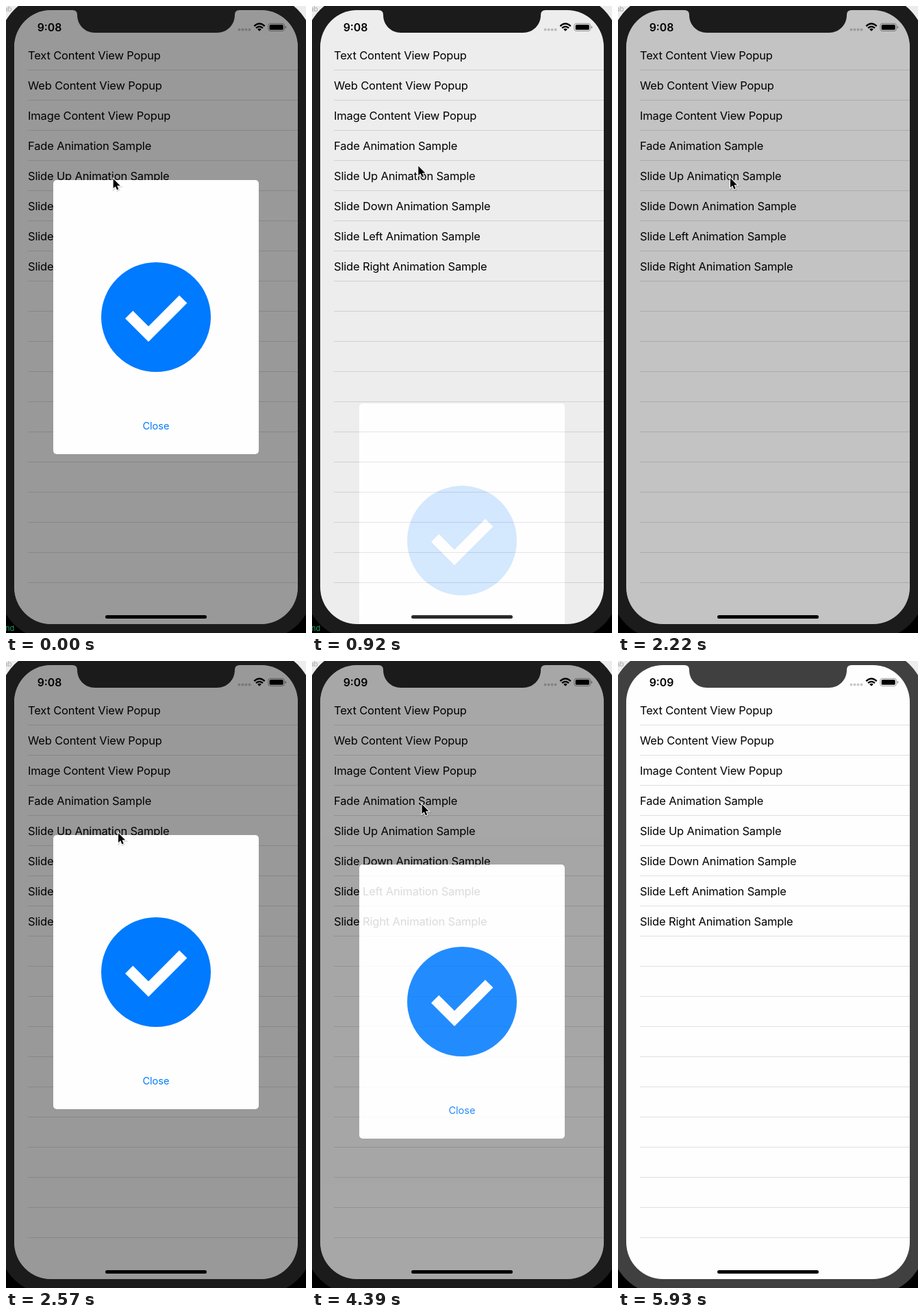
These frames come from a looping animation (438x915 px, 6.03 s). An HTML page:

```html
<!DOCTYPE html>
<html lang="en">
<head>
<meta charset="utf-8">
<title>Popup demo</title>
<style>
  html, body { margin: 0; width: 100%; height: 100%; overflow: hidden; background: #000; }
  svg { display: block; width: 438px; height: 915px; font-family: Inter, Roboto, sans-serif; }
  #rows { font-size: 16.5px; letter-spacing: -.16px; }
</style>
</head>
<body>
<svg viewBox="0 0 438 915">
  <defs>
    <clipPath id="screen"><rect x="12" y="6" width="414" height="896" rx="54"/></clipPath>
    <path id="arrow" d="M0 0V14L3.2 11.1 5.4 16.2 7.7 15.2 5.5 10.2H10Z"/>
  </defs>

  <!-- desktop behind the phone -->
  <rect width="438" height="60" fill="#ececec"/>
  <text x="-3" y="8" font-size="10" fill="#aaa">ab</text>
  <text id="desk" x="-1" y="912" font-size="11" fill="#1f9a63">nd</text>

  <rect class="body" x="-10" y="-16" width="458" height="940" rx="74"/>

  <g clip-path="url(#screen)">
    <rect x="12" y="6" width="414" height="896" fill="#fefefe"/>
    <g id="rows"></g>

    <text id="clock" x="63.5" y="36.5" font-size="15.8" font-weight="600" text-anchor="middle"></text>
    <path d="M340.5 34.5h16" stroke="#c8c8cb" stroke-width="4" stroke-linecap="round" stroke-dasharray="0 5"/>
    <path d="M362.3 29.3Q370 22.3 377.7 29.3M365 32.2Q370 27.8 375 32.2"
          fill="none" stroke="#000" stroke-width="2.3"/>
    <path d="M367.2 33.9Q370 31.6 372.8 33.9L370 36.8Z"/>
    <rect x="382.9" y="25.5" width="23.5" height="11" rx="3" fill="none" stroke="#000" stroke-opacity=".38"/>
    <rect x="384.7" y="27.2" width="20" height="7.6" rx="1.6"/>
    <path d="M407.7 29v4q1.6-.6 1.6-2t-1.6-2" fill-opacity=".45"/>
    <rect x="145" y="889" width="148" height="5" rx="2.5"/>

    <!-- the backdrop and the card fade together -->
    <g id="overlay">
      <rect x="12" y="6" width="414" height="896" fill-opacity=".4"/>
      <g id="card">
        <rect x="69" y="254" width="300" height="400" rx="5" fill="#fefefe"/>
        <circle cx="219" cy="454" r="80" fill="#007aff"/>
        <path d="M174 456L185.3 444.7 208 467.4 253 422.3 264.4 433.6 208 490Z" fill="#fefefe"/>
        <text x="219" y="617.6" font-size="14.6" text-anchor="middle" fill="#007aff">Close</text>
      </g>
    </g>
  </g>

  <path class="body" d="M97 5V6Q104 6 104 13C104 27.5 115 39 130 39H308C323 39 334 27.5 334 13Q334 6 341 6V5Z"/>

  <g id="cursor">
    <use href="#arrow" x=".5" y="1" fill="none" stroke="#000" stroke-opacity=".15" stroke-width="3"/>
    <use href="#arrow" stroke="#fff" stroke-width="2" paint-order="stroke"/>
  </g>
</svg>

<script>
const LOOP = 6030;
const CLOSE_1 = 698, OPEN = 2110, CLOSE_2 = 4321;
const TRAVEL = 661;   // from the card's place to below the screen
const GLIDE = 240;    // duration of one pointer move

const $ = id => document.getElementById(id);
const bodyParts = document.querySelectorAll('.body');

const kinds = ['Text Content View Popup', 'Web Content View Popup', 'Image Content View Popup',
  ...['Fade', 'Slide Up', 'Slide Down', 'Slide Left', 'Slide Right'].map(s => s + ' Animation Sample')];

$('rows').innerHTML = Array.from({ length: 18 }, (_, i) =>
  `<rect x="32" y="${93 + 44 * i}" width="394" height="1" fill="#e0e0e2"/>` +
  `<text x="32" y="${77.8 + 44 * i}">${kinds[i] || ''}</text>`).join('');

// Where the pointer rests, and when it arrives there
const stops = [
  { at: 210, x: 155.3, y: 233.5 },
  { at: 1630, x: 164, y: 251 },
  { at: 3520, x: 160.5, y: 209 },
  { at: 4880, x: 335.5, y: 861 },
  { at: 5290, x: 371, y: 920 }
];

// Eased progress from 0 to 1
function ramp(t, start, duration) {
  const u = Math.min(1, Math.max(0, (t - start) / duration));
  return u * u * (3 - 2 * u);
}

function pointer(t) {
  let x = 156.7, y = 253;
  for (const s of stops) {
    const k = ramp(t, s.at - GLIDE, GLIDE);
    x += (s.x - x) * k;
    y += (s.y - y) * k;
  }
  return `translate(${x} ${y})`;
}

function draw(now) {
  const t = now % LOOP;

  bodyParts.forEach(p => p.setAttribute('fill', t < 5930 ? '#1b1b1b' : '#404040'));
  $('desk').setAttribute('opacity', t < 1190 ? 1 : 0);
  $('clock').textContent = t < 3350 ? '9:08' : '9:09';

  const fade = 1 - ramp(t, CLOSE_1, 300) + ramp(t, OPEN, 200) - ramp(t, CLOSE_2, 300);
  const drop = ramp(t, CLOSE_1, 450) - ramp(t, OPEN + 150, 300) + ramp(t, CLOSE_2, 450);
  $('overlay').setAttribute('opacity', fade);
  $('card').setAttribute('transform', `translate(0 ${TRAVEL * drop})`);

  $('cursor').setAttribute('transform', pointer(t));
  requestAnimationFrame(draw);
}
requestAnimationFrame(draw);
</script>
</body>
</html>
```
